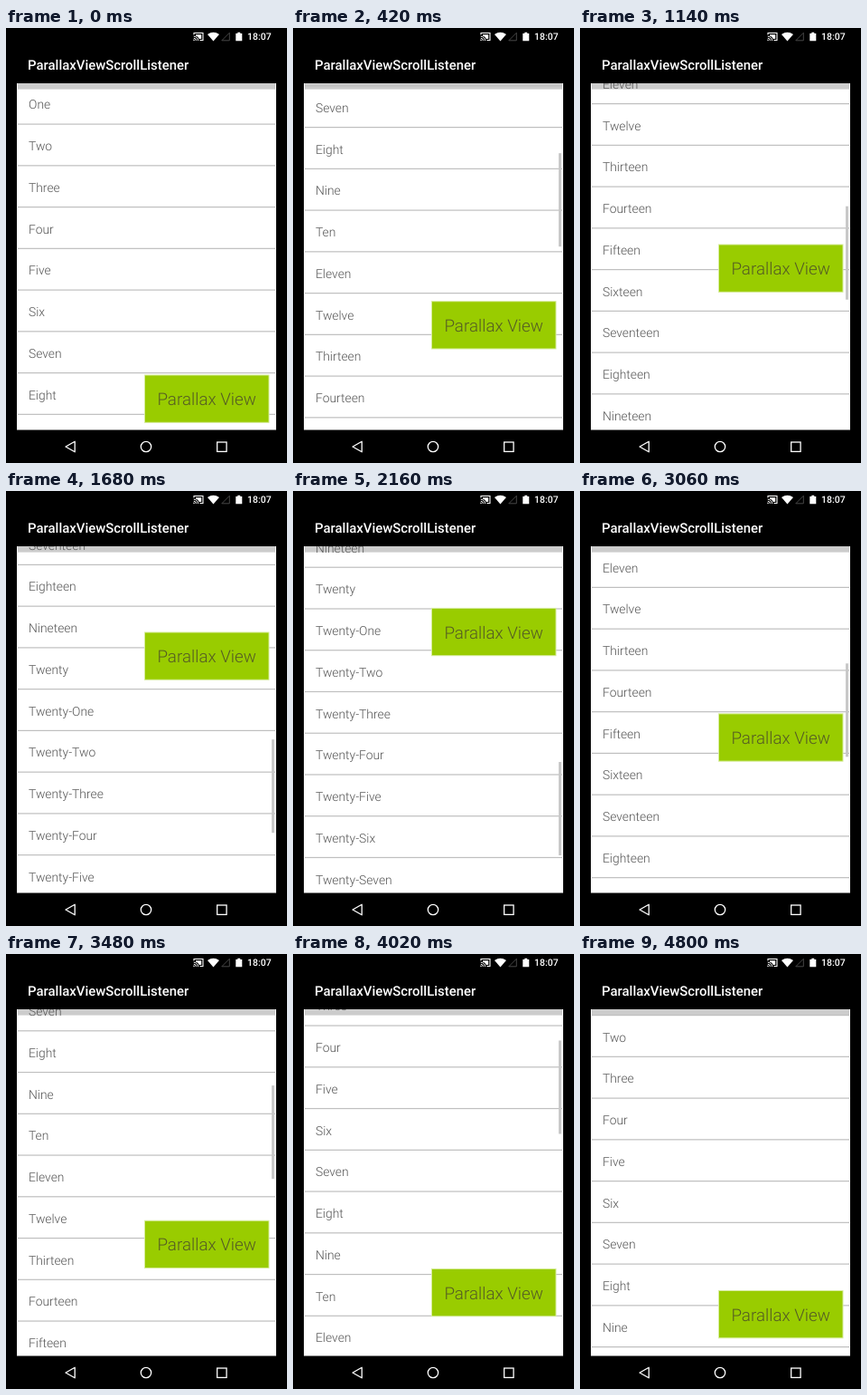
An HTML page that plays this animation: 311 by 480 pixels, repeating every 4.86 s.

```html
<!DOCTYPE html>
<html lang="en">
<head>
<meta charset="utf-8">
<title>Parallax list</title>
<style>
  html, body { margin: 0; width: 100%; height: 100%; overflow: hidden; background: #000; }
  svg { display: block; width: 311px; height: 480px; font-family: Roboto, "Open Sans", sans-serif; text-rendering: geometricPrecision; }
</style>
</head>
<body>
<svg viewBox="0 0 311 480" xmlns="http://www.w3.org/2000/svg">
  <defs><clipPath id="panel"><rect x="12" y="61" width="287" height="382.5"/></clipPath></defs>
  <rect width="311" height="480"/>

  <g id="status" fill="#fff">
    <path d="M208 7.5V5.5H218V13.5H214.5" fill="none" stroke="#fff" stroke-width="1.1"/>
    <path d="M207.8 9.2a4.8 4.8 0 0 1 4.8 4.8M207.8 11.3a2.7 2.7 0 0 1 2.7 2.7" fill="none" stroke="#fff"/>
    <path d="M207.4 12.6a1.5 1.5 0 0 1 1.5 1.5h-1.5zM210 7.3h6.2v4.6h-2.4q-1-2.4-3.8-3.4z"/>
    <path d="M223 7Q229.5 2.4 236 7L229.5 14.5z"/>
    <path d="M238.8 13.8H247.3V5.3z" fill="none" stroke="#484848"/>
    <path d="M254.3 6h2v-1.2h3V6h2v8.3h-7z"/>
    <text x="267" y="13.1" font-size="10.5" font-weight="500">18:07</text>
  </g>
  <text x="24" y="45.6" font-size="14.9" font-weight="500" fill="#fff">ParallaxViewScrollListener</text>

  <g clip-path="url(#panel)">
    <rect x="12" y="61" width="287" height="383" fill="#fff"/>
    <rect x="13" y="61" width="285" height="6.6" fill="#ccc"/>
    <g id="list" font-size="13.85" font-weight="300" fill="#555"></g>
    <rect id="bar" x="294" width="3" height="103" fill="#c8c8c8"/>
    <g id="box">
      <rect x="153.5" y="383" width="137.5" height="52.3" fill="#9c0" stroke="#d6ec9c"/>
      <text x="167.4" y="416.2" font-size="18.8" font-weight="300" fill="#555c24">Parallax View</text>
    </g>
  </g>

  <g fill="none" stroke="#fff" stroke-width="1.3">
    <path d="M66 462L76.2 456.2V467.8z" stroke-linejoin="round"/>
    <circle cx="155" cy="462" r="5.7"/>
    <rect x="233.7" y="457" width="10.4" height="10.4"/>
  </g>
</svg>
<script>
const LOOP = 4860, STEP = 60, PITCH = 45.75, PARALLAX = 0.3;
const $ = id => document.getElementById(id);

// Scroll path: time (ms), offset (px), speed (px/ms)
const path = [
  [0, 0, 0.6], [420, 271, 0.58], [1140, 480, 0.32], [1680, 756.7, 0.42],
  [2100, 850, 0], [2640, 637.5, -0.45], [3480, 295.8, -0.36], [4560, 38.5, 0]
];

const units = "One Two Three Four Five Six Seven Eight Nine".split(" ");
const names = [
  ...units,
  ..."Ten Eleven Twelve Thirteen Fourteen Fifteen Sixteen Seventeen Eighteen Nineteen Twenty".split(" "),
  ...units.map(u => "Twenty-" + u),
  "Thirty"
];

$("list").innerHTML = names.map((name, i) => {
  const y = i * PITCH;
  return `<text x="25" y="${89.4 + y}">${name}</text>` +
    `<rect x="13" y="${105.5 + y}" width="285" height="1.2" fill="#bfbfbf"/>`;
}).join("");

function scrollAt(t) {
  const k = path.findIndex(p => p[0] > t);
  if (k < 0) return path[path.length - 1][1];
  const [t0, y0, v0] = path[k - 1], [t1, y1, v1] = path[k];
  const d = t1 - t0, u = (t - t0) / d, w = 1 - u;
  return w * w * ((1 + 2 * u) * y0 + u * d * v0) + u * u * ((3 - 2 * u) * y1 - w * d * v1);
}

function barOpacity(t) {
  if (t < STEP || t >= 4800) return 0;
  return t >= 4740 ? 0.5 : 1;
}

function draw(time) {
  const t = Math.floor((time % LOOP) / STEP) * STEP;
  const s = scrollAt(t);
  $("list").setAttribute("transform", `translate(0 ${-s})`);
  $("box").setAttribute("transform", `translate(0 ${-s * PARALLAX})`);
  $("bar").setAttribute("y", 62.3 + s * 0.28);
  $("bar").setAttribute("opacity", barOpacity(t));
}

const start = performance.now();
function tick() {
  draw(performance.now() - start);
  requestAnimationFrame(tick);
}
tick();
</script>
</body>
</html>
```
